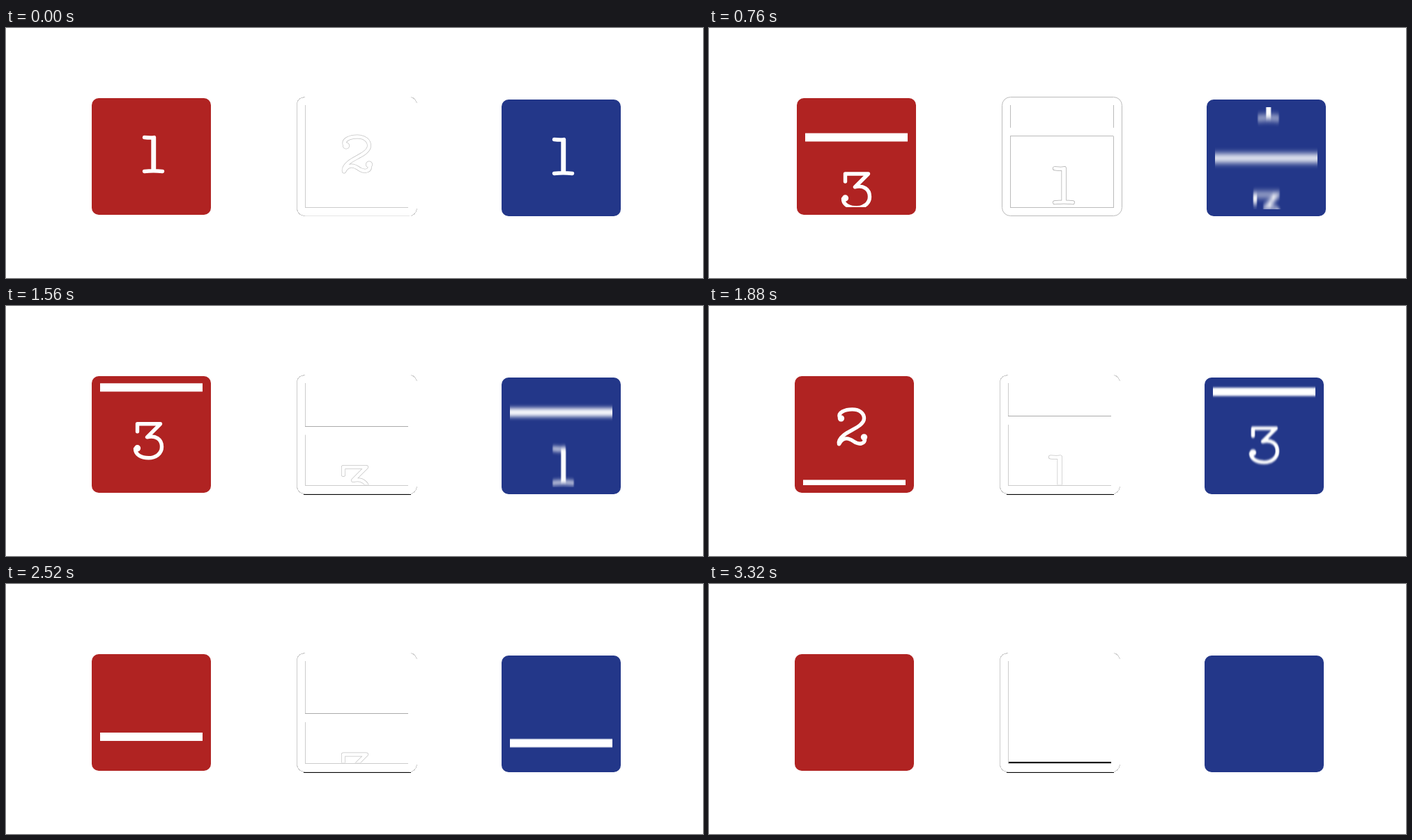
Write an HTML page that moves like this. It is 1000 px wide and 360 px high and loops after 3.84 s.

```html
<!DOCTYPE html>
<html lang="en">
<head>
<meta charset="utf-8">
<title>Three reels</title>
<style>
  html, body { margin: 0; width: 100%; height: 100%; overflow: hidden; background: #fff; }
  svg { display: block; width: 1000px; height: 360px; }
  .ink { fill: none; stroke: #fff; stroke-width: 5.4; stroke-linecap: round; stroke-linejoin: round; }
  .edge { fill: none; stroke: #aaa; stroke-width: 6; stroke-linecap: round; stroke-linejoin: round; }
  .edge + .ink { stroke-width: 4.6; }
  .line { fill: none; stroke: #bbb; stroke-width: 1; }
  .calm .line { stroke: #ccc; }
  .calm .edge { stroke: #c4c4c4; }
  .calm .top { stroke: #aaa; }
  path.line, .black { shape-rendering: crispEdges; }
  .bar { fill: #fff; }
  .black { stroke: #000; fill: none; }
  .calm .moving, .shaking .resting { display: none; }
</style>
</head>
<body>
<svg viewBox="0 0 1000 360">
  <defs>
    <clipPath id="window"><rect x="-73.5" y="-73.5" width="147" height="147"/></clipPath>
    <clipPath id="wideWindow"><rect x="-75" y="-73" width="150" height="146"/></clipPath>
    <filter id="speedBlur" filterUnits="userSpaceOnUse" x="-100" y="-1300" width="200" height="2700">
      <feGaussianBlur stdDeviation="0 0"/>
    </filter>
  </defs>
  <g id="stage"></g>
</svg>
<script>
const LOOP = 3840, STEP = 40, LAST = 3320, PITCH = 159;
const SHAKE = { from: 84, to: 1140, period: 264, size: 9 };
const FACES = ['', 3, 1, 2, 1, 3];
const TIMES = [0, 480, 760, 1240, 1880, 2520, 3320];
const BLUR = [0, 2.6, 4.8, 4.6, 1.5, 0.25, 0];

// Position is counted in faces; it grows while the strip runs down.
const REELS = [
  { x: 208.5, y: 184.5, top: 101, color: '#b02322', drift: -4,
    path: [-2, -1.525, -0.67, 1.258, 8.952, 11.723, 12] },
  { x: 503, y: 184.5, outline: true, drift: -3,
    path: [-3, -2.51, -1.719, 2.195, 8.377, 11.553, 12] },
  { x: 796.5, y: 187.5, top: 103, color: '#233789', drift: 0, blurred: true,
    path: [-2, -1.495, 1.5, 9.56, 17.098, 17.762, 18] }
];

const dot = (x, y) => `M${x - 2} ${y}a2 2 0 1 0 4 0a2 2 0 1 0-4 0`;
const DIGITS = {
  1: 'M-10-27Q0-26 4-27M2.5-26V21M4-26V21M-10 22Q3 20.5 16 22',
  2: 'M-17-16C-20-24-9-28 1-28C12-28 18-22 18-15C18-4-3 2-11 9' +
     'C-17 14-19 18-18 22C-12 11-4 13 3 18C10 23 20 23 19 13' + dot(-15, -15) + dot(18, 12),
  3: 'M-16-16V-27H17L-2-8C10-11 19-5 19 6C19 16 10 22 0 22C-11 22-19 17-19 9' + dot(-16, 8)
};

const mod = (a, n) => ((a % n) + n) % n;

function segment(t) {
  let i = 0;
  while (i < TIMES.length - 2 && t >= TIMES[i + 1]) i++;
  const span = TIMES[i + 1] - TIMES[i];
  return { i, span, u: (t - TIMES[i]) / span };
}

function linear(values, t) {
  const { i, u } = segment(t);
  return values[i] + (values[i + 1] - values[i]) * u;
}

// Monotone cubic curve that starts and ends at rest.
function smooth(values, t) {
  const slope = i => (values[i + 1] - values[i]) / (TIMES[i + 1] - TIMES[i]);
  const tangent = i => {
    if (i === 0 || i === TIMES.length - 1) return 0;
    const a = slope(i - 1), b = slope(i);
    return 2 * a * b / (a + b);
  };
  const { i, span, u } = segment(t);
  const rise = u * u * (3 - 2 * u);
  return values[i] + (values[i + 1] - values[i]) * rise
    + span * u * (1 - u) * ((1 - u) * tangent(i) - u * tangent(i + 1));
}

function faceMarkup(index, outline) {
  const face = FACES[mod(index, FACES.length)];
  const y = index * PITCH;
  const barTop = y - 85.5;
  let out = `<rect class="bar" x="-74.5" y="${barTop}" width="149.5" height="12"/>`;
  if (outline) {
    out += `<path class="line resting top" d="M-74 ${barTop}H74"/>` +
           `<path class="line moving" d="M-74 ${barTop + 12}H74"/>`;
  }
  if (face) {
    const d = DIGITS[face];
    out += `<g transform="translate(0 ${y})">` +
      (outline ? `<path class="edge" d="${d}"/>` : '') + `<path class="ink" d="${d}"/></g>`;
  }
  return out;
}

function cardMarkup(reel) {
  if (!reel.outline) {
    return `<rect x="-85.5" y="${reel.top - reel.y}" width="171" height="168" rx="10" fill="${reel.color}"/>`;
  }
  return `
    <rect class="line moving" x="-85.5" y="-85" width="172" height="171" rx="12"/>
    <path class="line resting" d="M-74-85Q-85.5-84-85.5-74V74Q-85.5 85-74 86M78-85Q85-83 86.5-76M86.5 76Q85 84 78 86"/>
    <path class="line resting" d="M-74 86H76" stroke-opacity=".5"/>
    <path class="black late" d="M-76 87H78"/>
    <path class="line" d="M-73.5-74V74H74"/>
    <path class="line moving" d="M74.5-74V74"/>`;
}

const stage = document.getElementById('stage');
stage.innerHTML = REELS.map(reel => {
  let faces = '';
  for (let i = -7; i <= 1; i++) faces += faceMarkup(i, reel.outline);
  return `<g class="reel">${cardMarkup(reel)}
    <g clip-path="url(#${reel.outline ? 'wideWindow' : 'window'})">
      <g><g class="strip">${faces}</g></g>
    </g>
    ${reel.outline ? '<path class="black end" stroke-width="2" d="M-73 72.5H74"/>' : ''}</g>`;
}).join('');

const groups = [...stage.querySelectorAll('.reel')];
const strips = [...stage.querySelectorAll('.strip')];
const digitGroups = strips.map(strip => [...strip.querySelectorAll('g')].map(node => {
  const y = node.transform.baseVal.getItem(0).matrix.f;
  return { node, y };
}));
const blur = document.querySelector('feGaussianBlur');
const late = stage.querySelector('.late');
const end = stage.querySelector('.end');

function draw(t) {
  const shaking = t >= STEP && t < SHAKE.to;
  const settled = t >= SHAKE.to;
  const shift = t > SHAKE.from && !settled
    ? Math.round(SHAKE.size * Math.sin((t - 480) / SHAKE.period * 2 * Math.PI)) : 0;
  const sigma = linear(BLUR, t);
  stage.setAttribute('class', shaking ? 'shaking' : 'calm');
  blur.setAttribute('stdDeviation', `0 ${sigma}`);
  REELS.forEach((reel, k) => {
    const y = mod(smooth(reel.path, t), FACES.length) * PITCH;
    groups[k].setAttribute('transform', `translate(${reel.x + shift} ${reel.y})`);
    strips[k].setAttribute('transform', `translate(0 ${y})`);
    strips[k].parentNode.setAttribute('filter',
      reel.blurred && sigma > 0.05 ? 'url(#speedBlur)' : 'none');
    digitGroups[k].forEach(digit =>
      digit.node.setAttribute('transform', `translate(${settled ? reel.drift : 0} ${digit.y})`));
  });
  late.style.display = settled ? '' : 'none';
  end.style.display = smooth(REELS[1].path, t) > 11.98 ? '' : 'none';
}

const start = performance.now();
function tick() {
  const t = (performance.now() - start) % LOOP;
  draw(Math.min(LAST, Math.floor(t / STEP) * STEP));
  requestAnimationFrame(tick);
}
tick();
</script>
</body>
</html>
```
